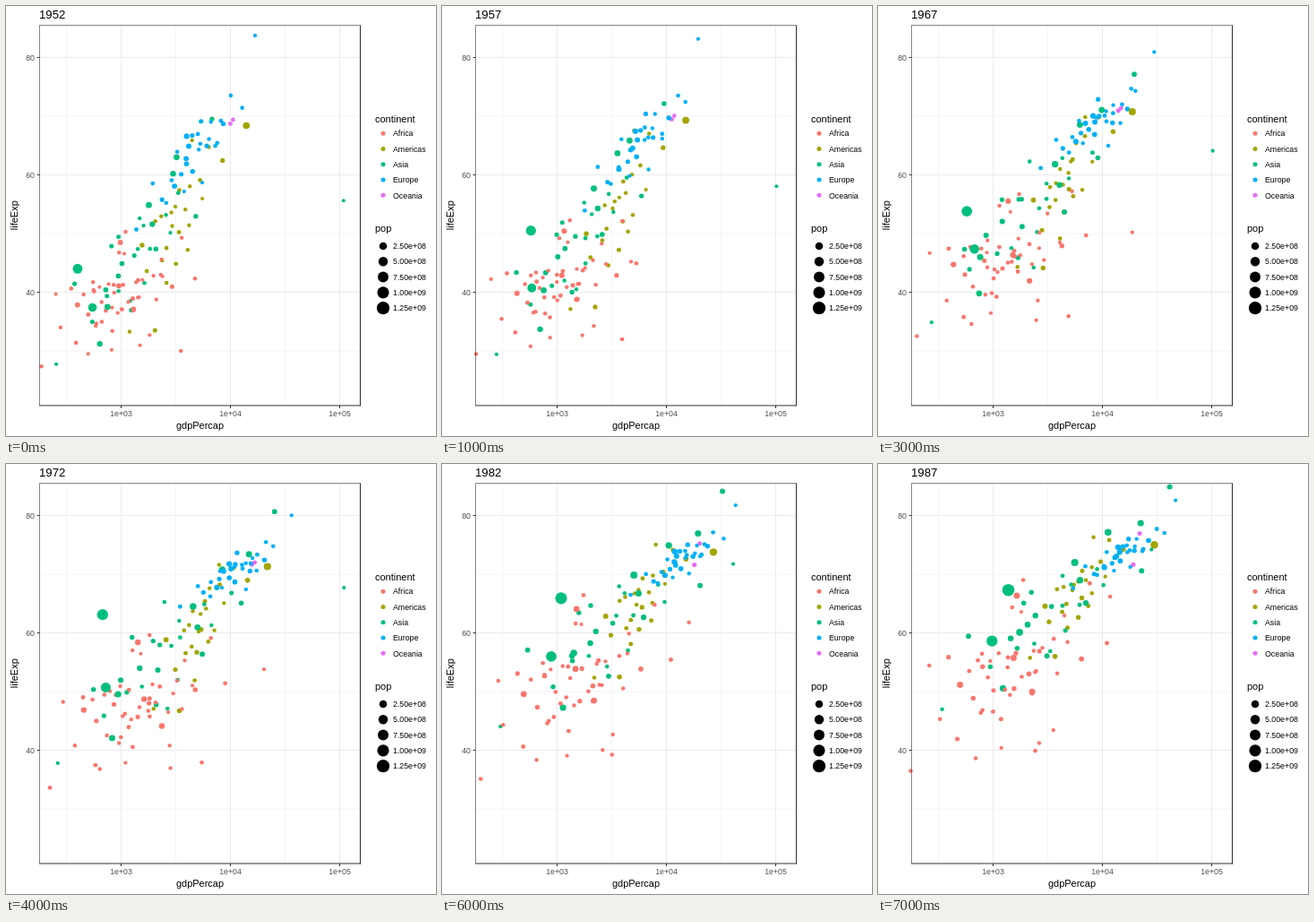
Write an HTML page that moves like this. It is 480 px wide and 480 px high and loops after 8000 ms.

```html
<!DOCTYPE html>
<html lang="en">
<head>
<meta charset="utf-8">
<title>Life expectancy and income</title>
<style>
  html, body { margin: 0; width: 100%; height: 100%; overflow: hidden; background: #fff; }
  svg { display: block; width: 100vw; height: 100vh; }
  text { font-family: "Liberation Sans", Arial, sans-serif; }
</style>
</head>
<body>
<svg id="stage" viewBox="0 0 480 480"></svg>
<script>
const FIRST = 1952, YEARS = 5, STEPS = 8, HOLD = 1000;
const GOLDEN = 0.618034;
const stage = document.getElementById('stage');

function el(tag, attrs, text) {
  const node = document.createElementNS('http://www.w3.org/2000/svg', tag);
  for (const k in attrs) node.setAttribute(k, attrs[k]);
  if (text) node.textContent = text;
  return stage.appendChild(node);
}
const line = (x1, y1, x2, y2, stroke, w) => el('line', { x1, y1, x2, y2, stroke, 'stroke-width': w });
const label = (x, y, text, size, fill = '#000', anchor = 'start') =>
  el('text', { x, y, 'font-size': size, fill, 'text-anchor': anchor }, text);

// Scales
const px = logGdp => 128.5 + 122 * (logGdp - 3);
const py = life => 188.5 + 6.55 * (60 - life);
const radius = size => 1.067 * size + 0.9;
const popRadius = millions => radius(1 + 5 * Math.sqrt(millions / 1318.6));

let seed = 52;
function random() {
  seed = (seed * 16807) % 2147483647;
  return seed / 2147483647;
}

// Close to the normal quantile of a rank between 0 and 1
function spread(rank) {
  const u = Math.min(0.985, Math.max(0.015, rank));
  return Math.log(u / (1 - u)) / 1.75;
}

// Piecewise linear path through points whose first entry is the step
function along(path, step) {
  const next = Math.max(1, path.findIndex(p => p[0] >= step));
  const a = path[next - 1], b = path[next];
  const k = (step - a[0]) / (b[0] - a[0]);
  return a.map((v, i) => v + (b[i] - v) * k);
}

// Cloud path: step, mean life, mean log gdp, deviation of life, deviation of log gdp.
// link ties life to income; pop is the typical size in millions, rate its yearly growth.
const regions = {
  Africa: { color: '#F8766D', count: 50, link: 0.45, pop: 3, rate: 0.026,
    path: [[0, 39.3, 2.96, 5, 0.29], [4, 47.5, 3.14, 5.7, 0.34], [7, 53.4, 3.15, 7.3, 0.37]] },
  Americas: { color: '#A3A500', count: 24, link: 0.72, pop: 4, rate: 0.021,
    path: [[0, 52.6, 3.5, 8, 0.2], [4, 62, 3.72, 6.5, 0.19], [7, 67.8, 3.77, 5.1, 0.2]] },
  Asia: { color: '#00BF7D', count: 28, link: 0.75, pop: 7, rate: 0.0205,
    path: [[0, 47, 3.13, 8.3, 0.32], [4, 57.6, 3.42, 9, 0.42], [7, 64.8, 3.57, 7.5, 0.47]] },
  Europe: { color: '#00B0F6', count: 30, link: 0.82, pop: 8, rate: 0.006,
    path: [[0, 64.4, 3.68, 5.8, 0.24], [4, 70.8, 4.05, 2.9, 0.21], [7, 73.8, 4.2, 2.6, 0.21]] },
  Oceania: { color: '#E76BF3', count: 2, link: 0, pop: 4, rate: 0.018,
    path: [[0, 69.2, 4.01, 0.2, 0.02], [4, 71.9, 4.21, 0.1, 0.02], [7, 75.3, 4.31, 1.5, 0.05]] }
};

function cloud(r) {
  return Array.from({ length: r.count }, (_, i) => {
    const zg = spread((i + 0.5) / r.count);
    const zl = spread((i * GOLDEN + 0.3 * random()) % 1);
    const pop = r.pop * Math.exp(1.1 * spread(random()));
    const phase = 6.28 * random();
    return {
      color: r.color, pop, rate: r.rate,
      at(step) {
        const [, life, g, dl, dg] = along(r.path, step);
        const sway = 0.1 * Math.sin(step + phase);
        const z = r.link * zg + Math.sqrt(1 - r.link ** 2) * zl;
        return [life + dl * (z - sway), g + dg * (zg + sway)];
      }
    };
  });
}

// A dot that stands out: step, life, gdp
function lead(name, pop, rate, ...points) {
  const path = points.map(([step, life, gdp]) => [step, life, Math.log10(gdp)]);
  return { color: regions[name].color, pop, rate, at: step => along(path, step).slice(1) };
}
const leads = [
  lead('Americas', 158, 0.0123, [0, 68.4, 13990], [2, 70.2, 16173], [4, 71.3, 21806], [7, 75, 29884]),
  lead('Asia', 556, 0.0191, [0, 44, 400], [1, 50.5, 576], [2, 44.5, 488], [4, 63.1, 677], [7, 67.3, 1379]),
  lead('Asia', 372, 0.0215, [0, 37.4, 547], [4, 50.7, 724], [7, 58.6, 977]),
  lead('Asia', 82, 0.0205, [0, 37.5, 750], [3, 46, 762], [7, 60.1, 1748]),
  lead('Asia', 86, 0.01, [0, 63, 3217], [2, 68.7, 6577], [4, 73.4, 14779], [7, 78.7, 22376]),
  lead('Asia', 0.2, 0.06, [0, 55.6, 108382], [2, 60.5, 95458], [4, 67.7, 109348], [5, 69.3, 59265], [7, 74.2, 28118]),
  lead('Africa', 1, 0.038, [0, 42.7, 2388], [3, 50.2, 18773], [5, 57.4, 21951], [7, 66.2, 11771]),
  lead('Africa', 4, 0.018, [0, 30, 3521], [4, 37.9, 5473], [7, 39.9, 2430])
];

// Grid
const DECADES = [3, 4, 5], AGES = [40, 60, 80];
function grid(shiftX, shiftY, w) {
  for (const g of DECADES) line(px(g + shiftX), 21.5, px(g + shiftX), 446, '#ebebeb', w);
  for (const v of AGES) line(37.5, py(v + shiftY), 395.5, py(v + shiftY), '#ebebeb', w);
}
grid(-0.5, -10, 0.55);
grid(0, 0, 1.07);

// Dots
const order = ['Oceania', 'Americas', 'Asia', 'Africa', 'Europe'];
const dots = order.flatMap(name => cloud(regions[name])).concat(leads);
for (const d of dots) d.node = el('circle', { fill: d.color });

// Frame and axes
line(37.5, 21.5, 395.5, 21.5, '#333', 0.6);
line(37.5, 21.5, 37.5, 446, '#333', 0.6);
line(395.5, 21.5, 395.5, 446.5, '#333', 1.07);
line(37, 446, 396, 446, '#333', 1.07);
for (const g of DECADES) {
  line(px(g), 446, px(g), 449, '#333', 1.07);
  label(px(g), 458, '1e+0' + g, 8.8, '#4d4d4d', 'middle');
}
for (const v of AGES) {
  line(34.7, py(v), 37.5, py(v), '#333', 1.07);
  label(32, py(v) + 3.2, String(v), 8.8, '#4d4d4d', 'end');
}
const title = label(37, 14, String(FIRST), 13.2);
label(216.5, 472, 'gdpPercap', 11, '#000', 'middle');
label(0, 0, 'lifeExp', 11, '#000', 'middle').setAttribute('transform', 'translate(13 233.7) rotate(-90)');

// Legends
function legend(top, heading, items) {
  label(412, top, heading, 11);
  items.forEach(({ text, r, fill }, i) => {
    const cy = top + 12.2 + (heading === 'pop' ? 3.8 : 0) + 17.28 * i;
    el('circle', { cx: 421, cy, r, fill });
    label(432, cy + 3.2, text, 8.8);
  });
}
legend(130, 'continent', Object.keys(regions).map(text => ({ text, r: radius(1.5), fill: regions[text].color })));
legend(252, 'pop', ['2.50e+08', '5.00e+08', '7.50e+08', '1.00e+09', '1.25e+09']
  .map(text => ({ text, r: popRadius(text / 1e6), fill: '#000' })));

let shown = -1;
function draw(ms) {
  const step = Math.floor(ms / HOLD) % STEPS;
  if (step === shown) return;
  shown = step;
  title.textContent = FIRST + YEARS * step;
  for (const d of dots) {
    const [life, g] = d.at(step);
    d.node.setAttribute('cx', px(g).toFixed(2));
    d.node.setAttribute('cy', py(life).toFixed(2));
    d.node.setAttribute('r', popRadius(d.pop * Math.exp(d.rate * YEARS * step)).toFixed(2));
  }
}

const start = performance.now();
function tick() {
  draw(performance.now() - start);
  requestAnimationFrame(tick);
}
tick();
</script>
</body>
</html>
```
